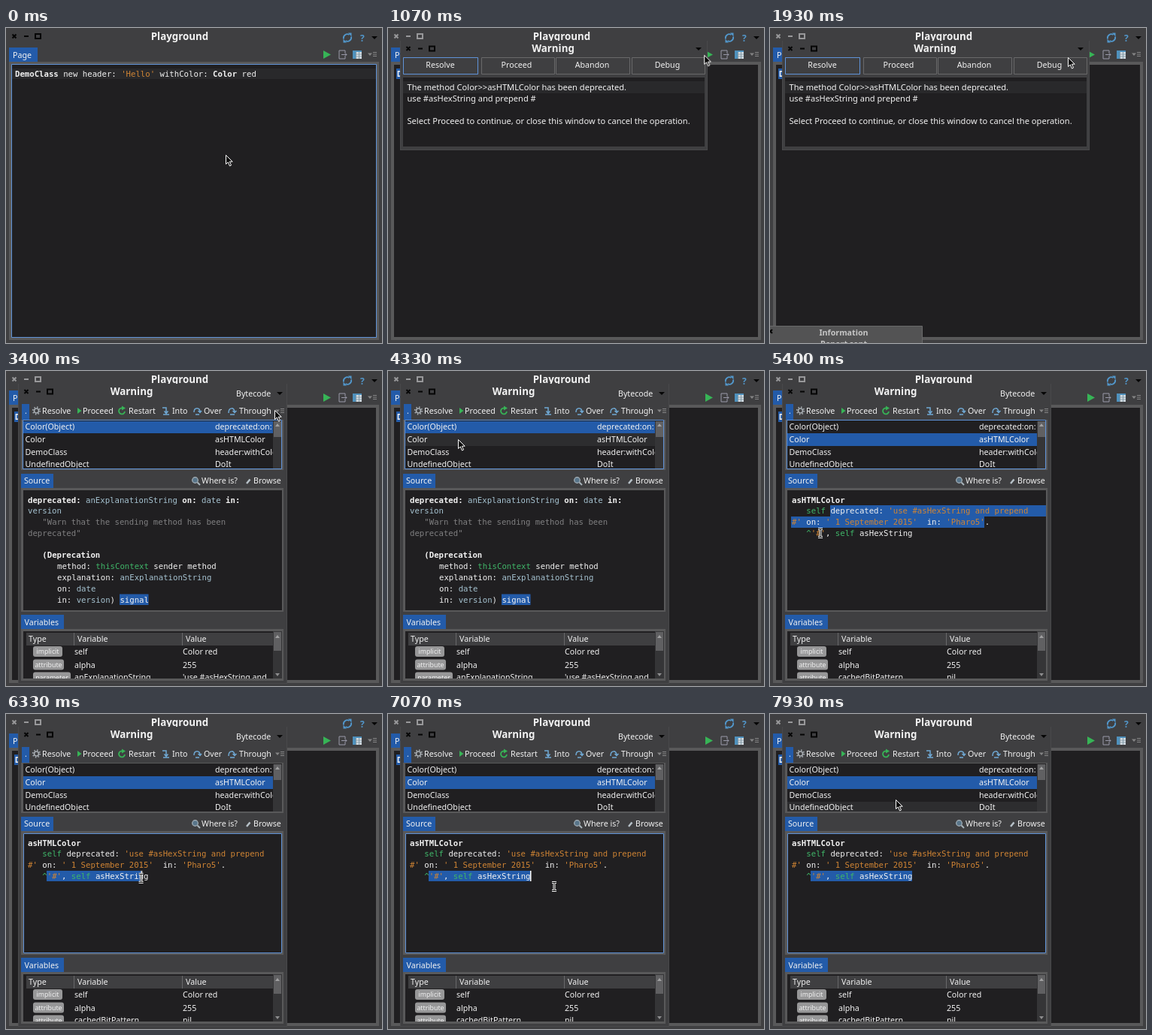
An HTML page that plays this animation: 500x420 px, repeating every 8 s.

```html
<!DOCTYPE html>
<html lang="en">
<head>
<meta charset="utf-8">
<title>Playground debugger</title>
<style>
html, body { margin: 0; width: 100%; height: 100%; overflow: hidden; background: #3f3f41; }
svg { display: block; width: 500px; height: 420px; }
text { font: 10.67px "Noto Sans", "Open Sans", sans-serif; fill: #f2f2f2; white-space: pre; }
.title { font-size: 13.33px; font-weight: 700; text-anchor: middle; }
.mid { text-anchor: middle; }
.msg { font-size: 11.1px; }
.code text { font-family: "DejaVu Sans Mono", monospace; }
.b { font-weight: 700; }
.str { fill: #cf8434; }
.arg { fill: #a5c2d0; }
.kw { fill: #3fb568; }
.note { fill: #7f7f80; }
.dim { fill: #c6c6c6; }
.chrome { fill: #3f3f41; }
.edge { fill: #49494b; }
.frame { fill: #59595a; }
.pane { fill: #201f21; }
.blue { fill: #235ba9; }
.hover { fill: #2d2d2f; }
.line { fill: #29292b; }
.thumb { fill: #606062; }
.track { fill: #353537; }
.focus { fill: none; stroke: #6093d8; }
.button { fill: #3f3f41; stroke: #69696a; }
.pill { fill: #979798; }
.pillText { font-size: 8.8px; text-anchor: middle; }
.black { color: #050505; }
.grey { color: #98989a; }

.step, .ease { animation: 8s step-end infinite; }
.ease { animation-timing-function: ease-in-out; }
.idle { animation-name: idle; }
.awake { animation-name: awake; }
.focused { animation-name: focused; }
.ran { animation-name: ran; }
.warning { animation-name: warning; }
.info { animation-name: info; }
.debugger { animation-name: debugger; }
.top { animation-name: top; }
.caller { animation-name: caller; }
.listFocus { animation-name: listFocus; }
.codeFocus { animation-name: codeFocus; }
.preselect { animation-name: preselect; }
.rowHover { animation-name: rowHover; }
.lastHover { animation-name: lastHover; }
.rowPick { animation-name: rowPick; }
.caretOn { animation-name: caretOn; }
.arrow { animation-name: arrow; }
.beam { animation-name: beam; }
.drag { animation-name: drag; }
.caretMove { animation-name: caretMove; }
.pointer { animation-name: pointer; }

@keyframes awake { 0% { opacity: 1 } 10%, 100% { opacity: 0 } }
@keyframes idle { 0% { opacity: 0 } 10%, 100% { opacity: 1 } }
@keyframes focused { 0% { opacity: 1 } 11.6%, 100% { opacity: 0 } }
@keyframes ran { 0% { opacity: 0 } 9%, 100% { opacity: 1 } }
@keyframes warning { 0% { opacity: 0 } 10% { opacity: 1 } 35%, 100% { opacity: 0 } }
@keyframes info { 0% { opacity: 0 } 15% { opacity: 1 } 37%, 100% { opacity: 0 } }
@keyframes debugger { 0% { opacity: 0 } 35%, 100% { opacity: 1 } }
@keyframes top { 0% { opacity: 1 } 57%, 100% { opacity: 0 } }
@keyframes caller { 0% { opacity: 0 } 57%, 100% { opacity: 1 } }
@keyframes listFocus { 0% { opacity: 1 } 70.5%, 100% { opacity: 0 } }
@keyframes codeFocus { 0% { opacity: 0 } 70.5%, 100% { opacity: 1 } }
@keyframes preselect { 0% { opacity: 0 } 57% { opacity: 1 } 70.5%, 100% { opacity: 0 } }
@keyframes rowHover { 0% { opacity: 0 } 50.5% { opacity: 1 } 57%, 100% { opacity: 0 } }
@keyframes lastHover { 0% { opacity: 0 } 97.5%, 100% { opacity: 1 } }
@keyframes rowPick { 0% { transform: none } 57%, 100% { transform: translateY(17px) } }
@keyframes caretOn { 0% { opacity: 0 } 70.5% { opacity: 1 } 95%, 100% { opacity: 0 } }
@keyframes arrow { 0% { opacity: 1 } 62.5% { opacity: 0 } 95%, 100% { opacity: 1 } }
@keyframes beam { 0% { opacity: 0 } 62.5% { opacity: 1 } 95%, 100% { opacity: 0 } }
@keyframes drag { 0%, 71% { transform: scaleX(0) } 81%, 100% { transform: scaleX(1) } }
@keyframes caretMove { 0%, 71% { transform: translateX(0) } 81%, 100% { transform: translateX(135px) } }
@keyframes pointer {
  0%, 2% { transform: translate(292px, 169px) }
  8%, 10.5% { transform: translate(426px, 35px) }
  20%, 34.5% { transform: translate(396px, 39px) }
  41%, 45% { transform: translate(357px, 52px) }
  53%, 57.5% { transform: translate(93px, 91px) }
  67%, 68% { transform: translate(67px, 216px) }
  70%, 71% { transform: translate(55px, 217px) }
  81% { transform: translate(189px, 219px) }
  84%, 89% { transform: translate(221px, 230px) }
  99%, 100% { transform: translate(167px, 114px) }
}
</style>
</head>
<body>
<svg viewBox="0 0 500 420">
  <defs>
    <g id="controls" fill="none" stroke="currentColor" stroke-width="2">
      <path d="M-2.500-2.500 2.500 2.500M2.500-2.500-2.500 2.500M13 0h6"/>
      <path d="M28-3h7v6h-7z"/>
    </g>
    <path id="down" d="M-4-2h8l-4 4z"/>
    <path id="up" d="M-3 2h6l-3-4z"/>
    <g id="menu" fill="#858586"><path d="M-6-1.500h6l-3 3.500z"/><path d="M1-3h5v1h-5zM1-.500h5v1h-5zM1 2h5v1h-5z"/></g>
    <g id="half"><path d="M-5 1.500a5 5 0 0 1 7.500-5.500" fill="none" stroke="#5297cb" stroke-width="1.800"/><path d="M1-6.500h4.500v5z" fill="#5297cb"/></g>
    <clipPath id="listClip"><path d="M23 67h332v62.500H23z"/></clipPath>
    <clipPath id="tableClip"><path d="M27 349h328v60.500H27z"/></clipPath>
  </defs>

  <!-- Playground -->
  <rect class="chrome" width="500" height="420"/>
  <use href="#controls" x="11" y="11" class="black step awake"/>
  <use href="#controls" x="11" y="11" class="grey step idle"/>
  <text class="title" x="231" y="15.500">Playground</text>
  <use href="#half" transform="translate(454 13)"/>
  <use href="#half" transform="translate(454 13) rotate(180)"/>
  <text x="471" y="17.500" class="b" style="font-size:12px;fill:#5297cb">?</text>
  <use href="#down" x="490" y="13" fill="#050505"/>
  <path class="blue" d="M4 26h38v19H4z"/>
  <text x="9" y="40">Page</text>
  <path d="M422 30l10 5.500-10 5.500z" fill="#37b456"/>
  <path d="M451 33v-3h-8v11h8v-3M446 35.500h7M450.500 33l2.500 2.500-2.500 2.500" fill="none" stroke="#9a9aaa"/>
  <path d="M461 30h12v11h-12z" fill="#d3dce2"/>
  <path d="M461 30h12v2h-12zM461 32h4v9h-4z" fill="#4f91bd"/>
  <path d="M465.500 32v9M469.500 32v9M465 35h8M465 38h8" stroke="#78909d" stroke-width=".8"/>
  <use href="#menu" x="487" y="35"/>
  <path class="frame" d="M4 45h492v371H4z"/>
  <path class="pane" d="M8 49h484v363H8z"/>
  <g class="step focused">
    <path class="line" d="M8 54h484v14H8z"/>
    <path class="focus" d="M7.500 48.500h485v364H7.500z"/>
  </g>
  <path class="blue step ran" d="M11 54h322v14H11z"/>
  <g class="code">
    <text x="12" y="65"><tspan class="b">DemoClass</tspan> new header: <tspan class="str">'Hello'</tspan> withColor: <tspan class="b">Color</tspan> red</text>
  </g>

  <!-- Warning dialog -->
  <g class="step warning">
    <path class="edge" d="M16 17h409v146H16z"/>
    <path class="chrome" d="M17 17h407v145H17z"/>
    <use href="#controls" x="27" y="27.500" class="black"/>
    <text class="title" x="219.500" y="32">Warning</text>
    <use href="#down" x="413" y="28" fill="#050505"/>
    <path class="button" d="M20.500 39.500h99v22h-99zM124.500 39.500h97v22h-97zM223.500 39.500h98v22h-98zM324.500 39.500h97v22h-97z"/>
    <path class="focus" d="M20.500 39.500h99v22h-99z"/>
    <g class="mid">
      <text x="69.500" y="53">Resolve</text>
      <text x="171" y="53">Proceed</text>
      <text x="271.500" y="53">Abandon</text>
      <text x="371.500" y="53">Debug</text>
    </g>
    <path class="pane" d="M20 66h401v92H20z"/>
    <path class="line" d="M20 71h401v16H20z"/>
    <text class="msg" x="25.500" y="83">The method Color&gt;&gt;asHTMLColor has been deprecated.</text>
    <text class="msg" x="25.500" y="98">use #asHexString and prepend #</text>
    <text class="msg" x="25.500" y="128">Select Proceed to continue, or close this window to cancel the operation.</text>
  </g>

  <!-- Debugger -->
  <g class="step debugger">
    <path class="edge" d="M16 17h358v400H16z"/>
    <path class="chrome" d="M17 17h356v399H17z"/>
    <use href="#controls" x="27" y="27.500" class="black"/>
    <text class="title" x="167" y="32">Warning</text>
    <text x="306" y="33.500">Bytecode</text>
    <use href="#down" x="364" y="30" fill="#050505"/>

    <path class="blue" d="M21 44h10v21H21z"/>
    <text x="25" y="57">.</text>
    <circle cx="40.500" cy="53" r="3" fill="none" stroke="#a9afb4" stroke-width="1.600"/>
    <circle cx="40.500" cy="53" r="4.800" fill="none" stroke="#a9afb4" stroke-width="1.800" stroke-dasharray="1.500 2.270"/>
    <path d="M95 49l5.500 4-5.500 4z" fill="#37b456"/>
    <path d="M155 49.500a4 4 0 1 0 3 4.500" fill="none" stroke="#37b456" stroke-width="1.800"/>
    <path d="M154 46.500l5 3-5 3z" fill="#37b456"/>
    <g fill="none" stroke="#70a9d4" stroke-width="1.500">
      <path d="M208 49h5v7M210.500 53.500l2.500 3 2.500-3M209 58h8"/>
      <path d="M250 55c0-7 8-7 8 0M255.500 53l2.500 2.500 2-2.500M252 58h5"/>
      <path d="M296 56c0-8 8-8 8-1M301.500 53l2.500 2.500 2.500-2.500M298 58h6"/>
    </g>
    <text x="48" y="57">Resolve</text>
    <text x="102" y="57">Proceed</text>
    <text x="163" y="57">Restart</text>
    <text x="221" y="57">Into</text>
    <text x="263" y="57">Over</text>
    <text x="310" y="57">Through</text>
    <use href="#menu" x="364" y="53"/>

    <path class="frame" d="M20 65h349v67H20z"/>
    <path class="pane" d="M23 66h344v64H23z"/>
    <g clip-path="url(#listClip)">
      <path class="hover step rowHover" d="M23 83h332v17H23z"/>
      <path class="hover step lastHover" d="M23 117h332v13H23z"/>
      <path class="blue step rowPick" d="M23 66h332v17H23z"/>
      <text x="25.500" y="78">Color(Object)</text><text x="278" y="78">deprecated:on:</text>
      <text x="25.500" y="95">Color</text><text x="278" y="95">asHTMLColor</text>
      <text x="25.500" y="112">DemoClass</text><text x="278" y="112">header:withColor:</text>
      <text x="25.500" y="128">UndefinedObject</text><text x="278" y="128">DoIt</text>
    </g>
    <path class="track" d="M355 67h12v63h-12z"/>
    <path class="thumb" d="M356 67h10v21h-10z"/>
    <use href="#up" x="361" y="72" fill="#a0a0a1"/>
    <path class="focus step listFocus" d="M22.500 65.500h344v65h-344z"/>

    <path class="blue" d="M20 137h43v19H20z"/>
    <text x="24" y="150">Source</text>
    <circle cx="251.500" cy="145.500" r="3.800" fill="#58758a" stroke="#a8b3ba" stroke-width="1.200"/>
    <path d="M254.500 148.500l3.500 3.500" stroke="#a8b3ba" stroke-width="2"/>
    <path d="M320 150l4.500-5.500" stroke="#b7c1c8" stroke-width="2.500"/>
    <text x="260" y="150">Where is?</text>
    <text x="329" y="150">Browse</text>
    <path class="frame" d="M20 156h349v165H20z"/>
    <path class="pane" d="M23 159h344v160H23z"/>

    <g class="code step top">
      <path class="blue" d="M151 297.500h38.500v14.500h-38.500z"/>
      <text x="29" y="176"><tspan class="b">deprecated:</tspan> <tspan class="arg">anExplanationString</tspan> <tspan class="b">on:</tspan> <tspan class="arg">date</tspan> <tspan class="b">in:</tspan></text>
      <text x="29" y="190" class="arg">version</text>
      <text x="48.300" y="205" class="note">"Warn that the sending method has been</text>
      <text x="29" y="219.500" class="note">deprecated"</text>
      <text x="48.300" y="249" class="b">(Deprecation</text>
      <text x="68" y="264">method: <tspan class="kw">thisContext</tspan> sender method</text>
      <text x="68" y="278.500">explanation: <tspan class="arg">anExplanationString</tspan></text>
      <text x="68" y="293.500">on: <tspan class="arg">date</tspan></text>
      <text x="68" y="308.500">in: <tspan class="arg">version</tspan>) signal</text>
    </g>

    <g class="code step caller">
      <path class="blue step preselect" d="M80 179h287v15H80zM28 194h257v15H28z"/>
      <g class="step codeFocus">
        <path class="blue ease drag" d="M54 209h135v14H54z" style="transform-origin:54px 0"/>
      </g>
      <text x="29" y="176" class="b">asHTMLColor</text>
      <text x="48.300" y="190"><tspan class="kw">self</tspan> deprecated: <tspan class="str">'use #asHexString and prepend</tspan></text>
      <text x="29" y="205"><tspan class="str">#'</tspan> on: <tspan class="str">' 1 September 2015'</tspan>&#160; in: <tspan class="str">'Pharo5'</tspan>.</text>
      <text x="48.300" y="220"><tspan class="kw">^</tspan><tspan class="str">'#'</tspan>, <tspan class="kw">self</tspan> asHexString</text>
      <g class="step caretOn"><path class="ease caretMove" d="M54 209h1.500v14h-1.500z" fill="#fff"/></g>
    </g>
    <path class="focus step codeFocus" d="M23.500 159.500h343v159h-343z"/>

    <path class="blue" d="M20 325h57v19H20z"/>
    <text x="24.500" y="338.500">Variables</text>
    <path class="frame" d="M20 344h349v69H20z"/>
    <path class="pane" d="M23 347h344v63H23z"/>
    <path class="chrome" d="M27 349h328v17H27z"/>
    <path d="M90.500 349v17M234.500 349v17" stroke="#68686a"/>
    <text x="30" y="361">Type</text>
    <text x="95" y="361">Variable</text>
    <text x="239" y="361">Value</text>
    <g clip-path="url(#tableClip)">
      <rect class="pill" x="36" y="367" width="39" height="14" rx="3"/>
      <text class="pillText" x="55.500" y="377">implicit</text>
      <text x="91" y="378">self</text><text x="235" y="378">Color red</text>
      <rect class="pill" x="36" y="384.500" width="41" height="14" rx="3"/>
      <text class="pillText" x="56.500" y="394.500">attribute</text>
      <text x="91" y="395.500">alpha</text><text x="235" y="395.500">255</text>
      <g class="step top">
        <rect class="pill" x="36" y="401.500" width="50" height="14" rx="3"/>
        <text class="pillText" x="61" y="411.500">parameter</text>
        <text x="91" y="412">anExplanationString</text><text x="235" y="412">'use #asHexString and</text>
      </g>
      <g class="step caller">
        <rect class="pill" x="36" y="401.500" width="41" height="14" rx="3"/>
        <text class="pillText" x="56.500" y="411.500">attribute</text>
        <text x="91" y="412">cachedBitPattern</text><text x="235" y="412">nil</text>
      </g>
    </g>
    <path class="track" d="M355 347h12v63h-12z"/>
    <path class="thumb" d="M356 348h10v25h-10z"/>
    <use href="#up" x="361" y="354" fill="#a0a0a1"/>
    <path d="M358 403h6l-3 4z" fill="#8d8d8e"/>
  </g>

  <!-- Notification -->
  <g class="step info">
    <path d="M-7.500 397.500h210v40h-210z" fill="#535354" stroke="#69696a"/>
    <path d="M-2 402l5 5M3 402l-5 5" stroke="#050505" stroke-width="2"/>
    <text class="mid b dim" x="98" y="410">Information</text>
    <text class="mid b dim" x="98" y="425">Report sent</text>
  </g>

  <g class="ease pointer">
    <path class="step arrow" d="M.500.500v12l2.800-2.600 2.200 5.100 2-1-2.200-4.800h3.900z" fill="#080808" stroke="#fff"/>
    <g class="step beam" fill="none">
      <path d="M-3-5.500h6M0-5.500v11M-3 5.500h6" stroke="#fff" stroke-width="3"/>
      <path d="M-3-5.500h6M0-5.500v11M-3 5.500h6" stroke="#080808"/>
    </g>
  </g>
</svg>
</body>
</html>
```
